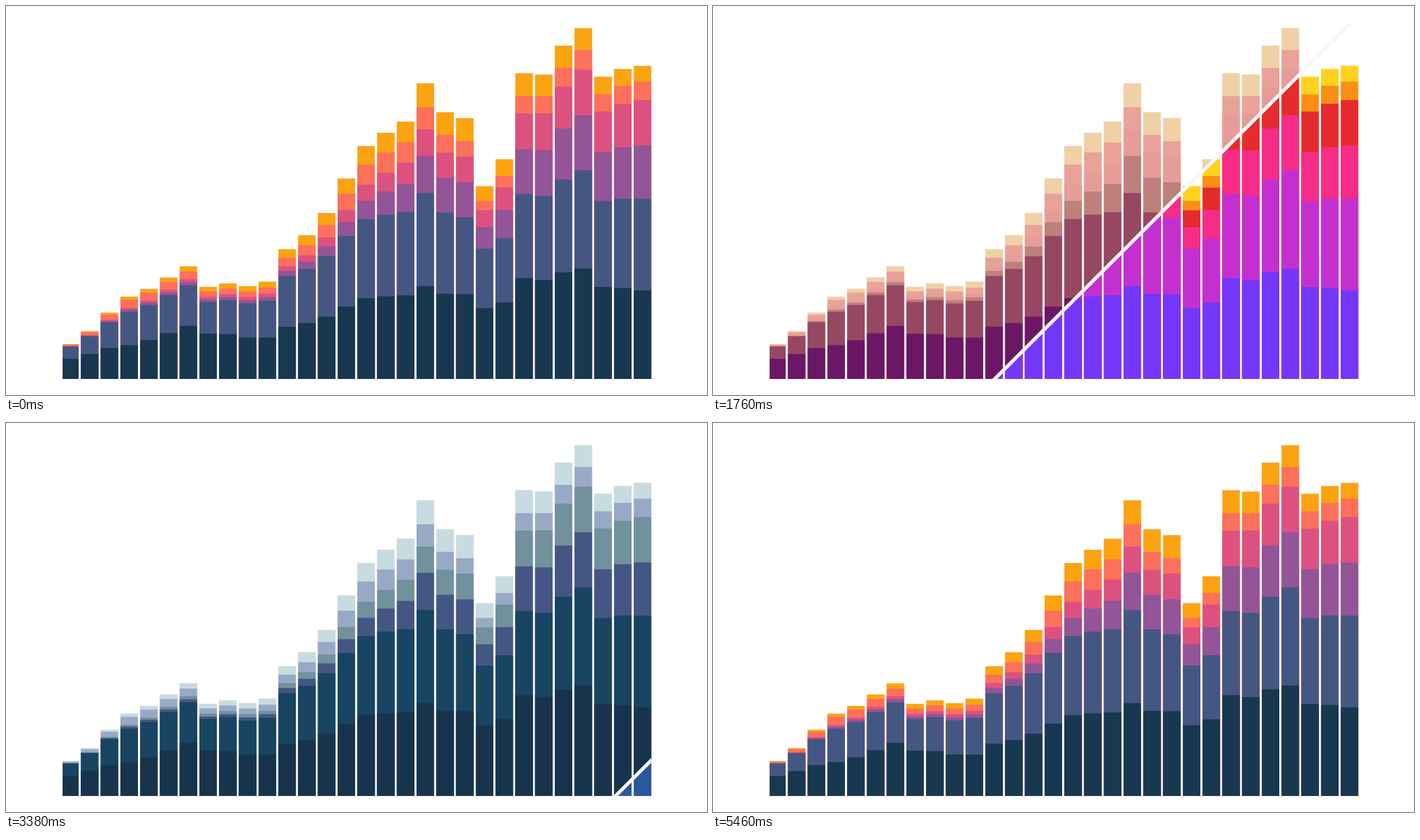
Write an HTML page with a canvas that moves like this. It is 1004 px wide and 558 px high and loops after 5.48 s.

```html
<!DOCTYPE html>
<html lang="en">
<head>
<meta charset="utf-8">
<title>Stacked bars, changing palettes</title>
<style>
  html, body { margin: 0; width: 100%; height: 100%; overflow: hidden; background: #fff; }
  canvas { display: block; width: 1004px; height: 558px; }
</style>
</head>
<body>
<canvas id="stage" width="1004" height="558"></canvas>
<script>
const LOOP = 5480, STEP = 20, PERIOD = 500, WIPE = 475;
const LEFT = 81.3, TOP = 25, RIGHT = 924, BASE = 535;
const ORIGIN = 79.1, PITCH = 28.28, BAR = 24.9;
const FROM = 94, TO = 1478; // wipe position, measured as x + y

const totals = [50, 68.5, 95, 118, 129, 145.5, 161.5, 132, 137, 133, 139.5, 186, 206, 238, 287.5,
  334, 353, 369, 424, 382.5, 374, 276.5, 315, 438.5, 436.5, 478, 503, 433.5, 444.5, 449];

// Bar number, then the cumulative share of each band from the bottom up; bars between are blended
const mixes = [
  [0, .577, .934, .934, .944, .984],
  [3, .411, .818, .843, .864, .962],
  [7, .492, .837, .864, .894, .951],
  [11, .403, .793, .833, .871, .935],
  [15, .347, .687, .765, .834, .921],
  [18, .314, .629, .755, .844, .919],
  [20, .325, .620, .754, .853, .912],
  [21, .367, .676, .787, .875, .924],
  [23, .330, .605, .751, .868, .925],
  [26, .315, .595, .752, .882, .938],
  [29, .283, .576, .746, .891, .950]
];

const palettes = [
  '#17384f #445782 #935498 #dc5180 #fc705c #fca311',
  '#d64847 #542423 #0a1517 #122838 #3c5480 #738f9c',
  '#e62a30 #ee6623 #fba414 #bec62a #658a52 #06814e',
  '#7437fa #c430d0 #f72c89 #e62b2f #fa8f14 #fdd31d',
  '#6c1766 #964762 #be807b #e69d98 #e9a297 #f0d1a5',
  '#6197dc #d07dc0 #e69c97 #f1d7be #f1dccb #c5dbe0',
  '#2a579d #7a9ac4 #5edacd #c6dd9b #f0d1a4 #f4e4de',
  '#18344c #174562 #445684 #71919d #98a9c6 #c7dce0',
  '#5a4838 #8c6a4a #c08a5a #deac6c #f0d1a5 #f4e4de',
  '#c6522d #deac6c #f0d1a5 #c6d99c #71919c #0d8583',
  '#264653 #2a9d8f #8ab17d #e9c46a #f4a261 #e76f51'
].map(p => p.split(' '));

const ctx = document.getElementById('stage').getContext('2d');

function sharesAt(bar) {
  const next = Math.max(1, mixes.findIndex(m => m[0] >= bar));
  const [a, ...low] = mixes[next - 1];
  const [b, ...high] = mixes[next];
  const k = (bar - a) / (b - a);
  return [...low.map((share, n) => share + (high[n] - share) * k), 1];
}

const bars = totals.map((height, i) => {
  const x = Math.max(LEFT, ORIGIN + PITCH * i);
  return {
    x,
    width: ORIGIN + PITCH * i + BAR - x,
    height,
    levels: sharesAt(i).map(share => share * height)
  };
});

function ease(u) {
  const p = 2.5;
  return u < 0.5 ? (2 * u) ** p / 2 : 1 - (2 - 2 * u) ** p / 2;
}

function drawBars(colors) {
  ctx.fillStyle = '#fff';
  ctx.fillRect(0, 0, 1004, 558);
  for (const { x, width, height, levels } of bars) {
    ctx.fillStyle = '#f4eef2';
    ctx.fillRect(x - 0.8, BASE - height - 0.8, width + 1.6, height + 0.8);
    for (let b = levels.length - 1; b >= 0; b--) {
      ctx.fillStyle = colors[b];
      ctx.fillRect(x, BASE - levels[b], width, levels[b]);
    }
  }
}

// Region above and to the left of the diagonal x + y = pos
function clipBehind(pos) {
  ctx.beginPath();
  ctx.moveTo(0, 0);
  ctx.lineTo(pos, 0);
  ctx.lineTo(0, pos);
  ctx.clip();
}

function drawDivider(pos) {
  ctx.save();
  ctx.beginPath();
  ctx.rect(80, TOP, RIGHT - 80, BASE - TOP);
  ctx.clip();
  ctx.strokeStyle = '#fcf7f8';
  ctx.lineWidth = 5;
  ctx.beginPath();
  ctx.moveTo(pos, 0);
  ctx.lineTo(pos - 600, 600);
  ctx.stroke();
  ctx.restore();
}

function render(now) {
  const t = Math.floor((now % LOOP) / STEP) * STEP;
  const index = Math.floor(t / PERIOD);
  const pos = FROM + (TO - FROM) * ease(Math.min(1, (t % PERIOD) / WIPE));
  drawBars(palettes[index]);
  ctx.save();
  clipBehind(pos);
  drawBars(palettes[(index + 1) % palettes.length]);
  ctx.restore();
  drawDivider(pos);
}

const start = performance.now();
function tick() {
  render(performance.now() - start);
  requestAnimationFrame(tick);
}
tick();
</script>
</body>
</html>
```
